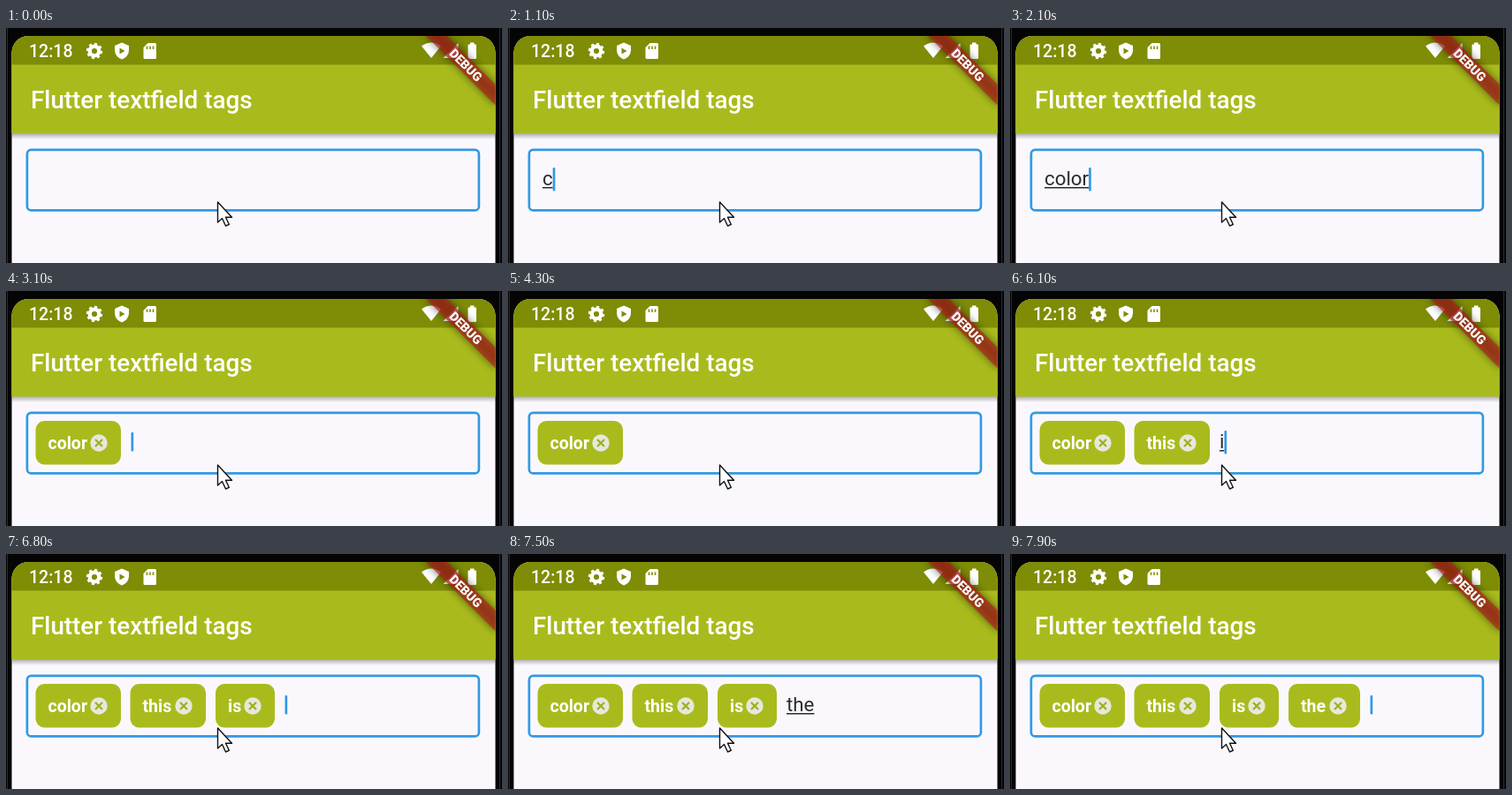
An HTML page for the animation above (8 s loop, 561 by 266 pixels).

```html
<!DOCTYPE html>
<html lang="en">
<head>
<meta charset="utf-8">
<title>Tag input</title>
<style>
  html, body { margin: 0; width: 100%; height: 100%; overflow: hidden; background: #050506; }
  svg { display: block; font-family: Roboto, sans-serif; }
  .bar { font-weight: 500; fill: #fff; }
  .label { font-size: 19.5px; font-weight: 700; fill: #fff; }
  #input { font-size: 22.3px; fill: #2b2b2f; }
</style>
</head>
<body>
<svg width="561" height="266" viewBox="0 0 561 266">
  <defs>
    <clipPath id="screen"><rect x="6.5" y="9" width="547" height="300" rx="19"/></clipPath>
    <linearGradient id="shade" x2="0" y2="1">
      <stop stop-opacity=".32"/><stop offset="1" stop-opacity="0"/>
    </linearGradient>
    <filter id="blur" x="-30%" y="-150%" width="160%" height="400%"><feGaussianBlur stdDeviation="5"/></filter>
  </defs>
  <path d="M1.5 0V266M558.5 0V266" stroke="#2c2c2f"/>
  <g clip-path="url(#screen)">
    <rect width="561" height="266" fill="#faf8fc"/>
    <rect y="119" width="561" height="7" fill="url(#shade)"/>
    <rect width="561" height="119.5" fill="#a9bb1c"/>
    <rect width="561" height="41.5" fill="#7f8c06"/>
    <text class="bar" x="26" y="33" font-size="19.5">12:18</text>
    <text class="bar" x="28" y="91" font-size="27.8">Flutter textfield tags</text>

    <g fill="none" stroke="#fff">
      <circle cx="100" cy="26" r="5.3" stroke-width="4.4"/>
      <circle cx="100" cy="26" r="8" stroke-width="2.4" pathLength="16" stroke-dasharray="1"/>
    </g>
    <g fill="#fff">
      <path d="M131 16.5L139 20V25.5Q138.500 32.500 131 35.500Q123.500 32.500 123 25.500V20Z"/>
      <path d="M160.500 17H168.500Q170 17 170 18.500V33.500Q170 35 168.500 35H157Q155.500 35 155.500 33.500V22Z"/>
      <path d="M481 34L470 20.500Q481 12.500 492 20.500Z"/>
      <path d="M511.500 17V34H494.500Z"/>
      <path d="M525 16.500H529.500V18.500H531Q532 18.500 532 19.500V34Q532 35 531 35H523.500Q522.500 35 522.500 34V19.500Q522.500 18.500 523.500 18.500H525Z"/>
    </g>
    <path d="M128.500 22.500L134.500 26L128.500 29.500Z" fill="#7f8c06"/>
    <path d="M159.500 20.500V24M163 20.500V24M166.500 20.500V24" stroke="#7f8c06" stroke-width="1.6"/>

    <g transform="translate(553.500 8.500) rotate(45)">
      <rect x="-55.600" y="39" width="111.200" height="16.700" opacity=".5" filter="url(#blur)"/>
      <rect x="-55.600" y="39" width="111.200" height="16.700" fill="#b71c1c" fill-opacity=".63"/>
      <text y="52.300" font-size="14.200" font-weight="900" fill="#fff" text-anchor="middle">DEBUG</text>
    </g>

    <rect x="23.900" y="137.900" width="511" height="68.500" rx="4.500" fill="none" stroke="#3299e3" stroke-width="2.700"/>
    <g id="tags"></g>
    <text id="input" y="178"></text>
    <rect id="underline" y="180" height="1.500" fill="#2b2b2f"/>
    <rect id="caret" width="2.700" rx="1" fill="#3299e3"/>
  </g>
  <path d="M239.500 197V220L244.500 215.500L248.500 224L252.300 222.300L248.500 214.200H255.500Z"
        fill="#fff" stroke="#111" stroke-width="1.400" stroke-linejoin="round"/>
</svg>
<script>
const $ = id => document.getElementById(id);
const input = $("input"), underline = $("underline"), caret = $("caret");
const LOOP = 8000;

// keys: when each letter is typed; done: when the word turns into a tag
const words = [
  { text: "color", x: 33.5, w: 96.5, keys: [1000, 1200, 1500, 1900, 2100], done: 3100 },
  { text: "this", x: 140.5, w: 85.5, keys: [4700, 4800, 4900, 5000], done: 5700 },
  { text: "is", x: 237, w: 67, keys: [6000, 6300], done: 6700 },
  { text: "the", x: 315, w: 81, keys: [7000, 7200, 7400], done: 7600 }
];

$("tags").innerHTML = words.map(({ text, x, w }) => `<g transform="translate(${x} 0)">
  <rect y="147" width="${w}" height="49.500" rx="10" fill="#a9bb1c"/>
  <text class="label" x="14" y="179">${text}</text>
  <g transform="translate(${w - 25} 172)">
    <circle r="9.700" fill="#e6e8dc"/>
    <path d="M-4 -4L4 4M4 -4L-4 4" stroke="#a0b01f" stroke-width="2.300"/>
  </g>
</g>`).join("");
const tags = [...$("tags").children];

function caretOn(t) {
  if (t < 2100) return (t >= 100 && t < 500) || (t >= 1000 && t < 1500);
  if (t < 3100) return true;
  return (t + 300) % 1000 < 500;
}

function draw(t) {
  const count = words.filter(word => t >= word.done).length;
  tags.forEach((tag, i) => tag.setAttribute("visibility", i < count ? "visible" : "hidden"));

  const word = words[count], last = words[count - 1];
  const left = last ? last.x + last.w + 11 : 39;
  const typed = word ? word.text.slice(0, word.keys.filter(k => t >= k).length) : "";
  input.textContent = typed;
  input.setAttribute("x", left);
  const width = typed ? input.getComputedTextLength() : 0;
  underline.setAttribute("x", left);
  underline.setAttribute("width", width);

  caret.setAttribute("x", left + width + (typed ? 0 : 0.5));
  caret.setAttribute("y", typed ? 158 : 160);
  caret.setAttribute("height", typed ? 26.5 : 21.5);
  caret.setAttribute("visibility", caretOn(t) ? "visible" : "hidden");
}

const start = performance.now();
function tick() {
  draw((performance.now() - start) % LOOP);
  requestAnimationFrame(tick);
}
tick();
</script>
</body>
</html>
```
